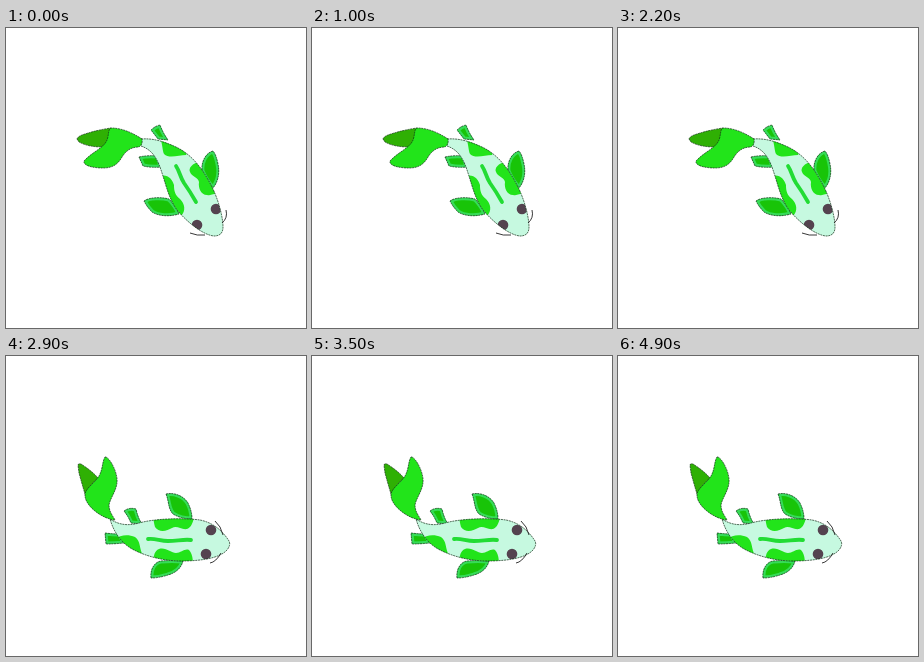
An HTML page that plays this animation: 300 px wide and 300 px high, repeating every 5 s.

```html
<!DOCTYPE html>
<html lang="en">
<head>
<meta charset="utf-8">
<title>Koi</title>
<style>
  html, body { margin: 0; width: 100%; height: 100%; overflow: hidden; background: #fff; }
  svg { display: block; width: 100vw; height: 100vh; }
  .edge { fill: none; stroke: #123018; stroke-width: .7; stroke-dasharray: 2 .7; }
  .body { fill: #c6f9e0; }
  .bright { fill: #22e41a; }
  .dark { fill: #2fb004; }
  .fin { fill: #18c408; }
  .rim { fill: none; stroke: #36dc58; stroke-width: 5; }
  .stripe { fill: none; stroke: #22dc34; stroke-width: 3.8; stroke-linecap: round; }
  .eye { fill: #54434f; }
  .whisker { fill: none; stroke: #222; stroke-width: .9; }
</style>
</head>
<body>
<svg id="stage" viewBox="0 0 300 300"></svg>
<script>
const stage = document.getElementById('stage');

const diving = {
  body: 'M135 111C148 110 159 114 170 119C187 127 198 143 206 159C213 173 217 190 217 199C217 206 213 208 208 208C197 207 181 194 171 182C163 171 160 157 156 145C152 132 147 122 135 118Z',
  tail: 'M136 111C127 105 116 100 105 100C102 101 103 107 101 112C98 120 86 124 78 133C77 138 88 140 97 140C107 140 112 136 116 129C121 121 127 119 133 119Q137 116 136 111Z',
  tailBack: 'M71 111Q72 108 79 106Q91 102 105 100Q104 113 97 119Q82 119 73 114Z',
  fins: [
    'M207 123C199 125 195 135 196 143Q200 153 207 160C212 154 214 145 212 136Q210 126 207 123Z',
    'M138 173C143 169 156 169 163 171Q170 178 173 186C163 189 152 188 146 184Q141 179 138 173Z',
    'M145 102Q149 98 154 97Q157 105 162 112L152 111Z',
    'M133 129Q142 127 152 128L155 139Q146 140 137 138Z'
  ],
  spots: [
    'M153 108C157 115 156 122 158 126C163 131 173 127 180 127L184 120L165 108Z',
    'M193 134C187 135 182 140 184 144C186 149 192 149 193 154C192 160 195 167 201 167Q206 168 212 164L204 146Z',
    'M154 148C162 146 166 151 168 157C168 163 169 167 174 171C179 176 180 183 175 188L165 182Z'
  ],
  stripe: 'M170 138C174 144 174 149 178 155C183 162 186 167 190 174',
  eyes: [[210, 181], [191, 197]],
  whiskers: ['M220 182Q222 190 216 195', 'M184 205Q191 208 199 207']
};

const level = {
  body: 'M104 163C113 169 122 170 133 167C151 162 180 162 194 164C209 167 218 177 223 185Q225 189 221 194C213 203 192 205 175 205C157 205 140 200 128 194C116 188 108 177 104 163Z',
  tail: 'M99 101C102 100 110 112 111 123C112 133 104 142 103 149C103 156 107 160 109 164C97 163 80 151 79 140C78 133 89 127 93 120C97 113 96 106 99 101Z',
  tailBack: 'M72 109Q73 106 78 110Q87 116 92 122Q84 129 79 138Q76 128 73 117Z',
  fins: [
    'M160 138C168 136 178 140 182 147Q186 155 186 163Q175 163 167 158C162 153 163 145 160 138Z',
    'M145 222C144 214 148 206 155 205Q166 204 177 205C175 213 169 217 162 219Q153 222 145 222Z',
    'M118 155Q123 151 130 153Q132 162 136 168L125 167Q122 160 118 155Z',
    'M99 177Q107 178 114 178L118 187Q108 188 100 188Z'
  ],
  spots: [
    'M147 160Q148 168 149 171C153 177 161 175 166 172C171 169 175 174 181 173C186 171 186 167 189 160Z',
    'M147 206C148 200 148 195 153 193C160 191 165 197 170 197C175 197 179 192 183 194Q187 198 187 208Z',
    'M109 183C114 179 122 178 129 181C135 185 133 193 137 199L120 196Z'
  ],
  stripe: 'M142 183C149 182 154 185 162 185C171 185 178 183 185 184',
  eyes: [[205, 174], [200, 198]],
  whiskers: ['M209 165Q215 170 217 179', 'M204 207Q210 206 215 197']
};

const path = (d, name, extra = '') => `<path class="${name}" d="${d}" ${extra}/>`;
const outlined = (d, name) => path(d, name) + path(d, 'edge');
const clipTo = (id, d, content) =>
  `<clipPath id="${id}"><path d="${d}"/></clipPath><g clip-path="url(#${id})">${content}</g>`;

function drawFish(name, fish) {
  const fins = fish.fins.map((d, i) =>
    clipTo(`${name}-fin${i}`, d, path(d, 'fin') + path(d, 'rim')) + path(d, 'edge'));
  const eyes = fish.eyes.map(([x, y]) => `<circle class="eye" cx="${x}" cy="${y}" r="5.3"/>`);
  const markings = fish.spots.map(d => path(d, 'bright')).join('') + eyes.join('');
  return `<g id="${name}">` + fins.join('') +
    path(fish.body, 'body') +
    clipTo(`${name}-skin`, fish.body, markings) +
    path(fish.body, 'edge') +
    path(fish.stripe, 'stripe') +
    outlined(fish.tailBack, 'dark') + outlined(fish.tail, 'bright') +
    fish.whiskers.map(d => path(d, 'whisker')).join('') + '</g>';
}

stage.innerHTML = drawFish('diving', diving) + drawFish('level', level);
const divingFish = document.getElementById('diving');
const levelFish = document.getElementById('level');

const LOOP = 5000, BEAT = 100, REST_START = 4100, REST_END = 4500;

function isLevel(time) {
  if (time >= REST_START && time < REST_END) return false;
  const start = time < REST_START ? 0 : REST_END - BEAT;
  return Math.floor((time - start) / BEAT) % 2 === 1;
}

function render(time) {
  const flat = isLevel(time % LOOP);
  divingFish.style.display = flat ? 'none' : '';
  levelFish.style.display = flat ? '' : 'none';
}

const startTime = performance.now();
function tick() {
  render(performance.now() - startTime);
  requestAnimationFrame(tick);
}
render(0);
requestAnimationFrame(tick);
</script>
</body>
</html>
```
